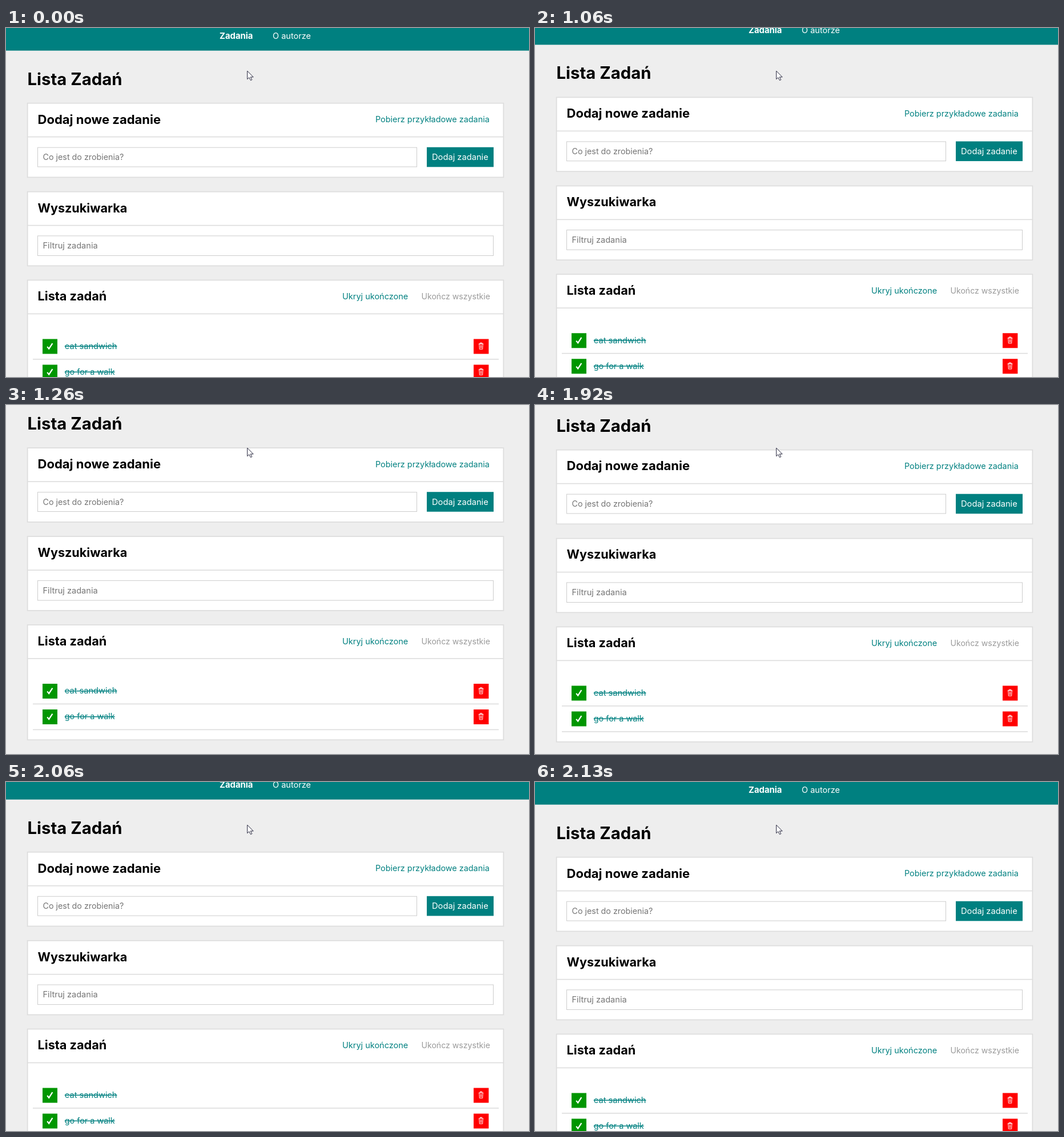
An HTML page that plays this animation: 916x611 px, repeating every 3.19 s.

```html
<!DOCTYPE html>
<html lang="pl">
<head>
<meta charset="utf-8">
<title>Lista Zadań</title>
<style>
  html, body { margin: 0; width: 100%; height: 100%; overflow: hidden; background: #eee; }
  svg { display: block; width: 916px; height: 611px; }
  text { font-family: Inter, "Open Sans", sans-serif; white-space: pre; }
  .bold { font-weight: 700; }
  .done { text-decoration: line-through; }
</style>
</head>
<body>
<svg viewBox="0 0 916 611">
  <g id="page"></g>
  <path d="M422.7 75.2V89.6L425.9 86.7L428.5 91.7L430.8 90.6L428.3 85.9H433.2Z"
        fill="#fff" stroke="#23233a" stroke-width="1" stroke-linejoin="round"/>
</svg>
<script>
const LOOP = 3190, TRAVEL = 56.5;
const TEAL = '#008080', LINE = '#ddd', HINT = '#757575';
const page = document.getElementById('page');

function add(tag, attrs, content) {
  const el = document.createElementNS('http://www.w3.org/2000/svg', tag);
  for (const key in attrs) el.setAttribute(key, attrs[key]);
  if (content) el.textContent = content;
  page.appendChild(el);
}

function rect(x, y, width, height, fill) {
  add('rect', { x, y, width, height, fill });
}

function framed(x, y, w, h, line, color) {
  rect(x, y, w, h, color);
  rect(x + line, y + line, w - 2 * line, h - 2 * line, '#fff');
}

function text(content, x, y, size, fill, style = '') {
  add('text', { x, y, fill, 'font-size': size, class: style }, content);
}

function stroke(d, width) {
  add('path', { d, fill: 'none', stroke: '#fff', 'stroke-width': width });
}

function card(title, y, h, size) {
  framed(36.8, y, 835.4, h, 1.7, LINE);
  rect(37, y + 59, 835, 1.6, LINE);
  text(title, 55.5, y + 36.7, size, '#000', 'bold');
}

function task(name, y, size) {
  rect(64, y, 26, 26, '#009600');
  stroke(`M72.2 ${y + 13.4}l3 3.8l6.2 -9.6`, 2.2);
  text(name, 102.8, y + 17.4, size, TEAL, 'done');
  rect(819, y, 26.4, 26, '#f00');
  const top = y + 8.6;
  stroke(`M827.8 ${top}h8.4M830.4 ${top - 0.6}v-1.2h3.2v1.2`, 1.1);
  stroke(`M828.7 ${top}l.6 9.2h5.4l.6 -9.2M831 ${top + 2}v5.6M833 ${top + 2}v5.6`, 0.9);
  rect(47, y + 34.6, 816, 1.6, LINE);
}

function build() {
  rect(0, -1, 916, 40.6, TEAL);
  text('Zadania', 374, 18.8, 14.9, '#fff', 'bold');
  text('O autorze', 467, 18.8, 14.5, '#fff');
  text('Lista Zadań', 37.5, 99.7, 29.3, '#000', 'bold');

  card('Dodaj nowe zadanie', 130.8, 131.4, 22);
  text('Pobierz przykładowe zadania', 647, 165.2, 14.4, TEAL);
  framed(55, 208.7, 665, 34.8, 1, '#ccc');
  text('Co jest do zrobienia?', 64.5, 231, 14.3, HINT);
  rect(737, 208.7, 117, 34.6, TEAL);
  text('Dodaj zadanie', 746, 231, 14.7, '#fff');

  card('Wyszukiwarka', 285.8, 131.4, 21.6);
  framed(55, 363.4, 799, 35.6, 1, '#ccc');
  text('Filtruj zadania', 64.5, 386, 14.6, HINT);

  card('Lista zadań', 440.6, 203, 21.7);
  text('Ukryj ukończone', 589, 475, 14.5, TEAL);
  text('Ukończ wszystkie', 727.5, 475, 14.1, '#9a9a9a');
  task('eat sandwich', 544.5, 14.6);
  task('go for a walk', 589.5, 14.4);
}

const ease = u => (1 - Math.cos(Math.PI * Math.min(1, u))) / 2;

// Eased progress, held between the moments at which the view refreshes.
function progress(t, moments, first) {
  const n = moments.filter(m => t >= m).length;
  if (!n) return 0;
  return n === moments.length ? 1 : ease(first + 0.29 * (n - 1));
}

function scrollAt(t) {
  const down = progress(t, [1060, 1130, 1190, 1260], 0.28);
  const up = progress(t, [1920, 1990, 2060, 2130], 0.16);
  return TRAVEL * (down - up);
}

const start = performance.now();
function tick() {
  const t = (performance.now() - start) % LOOP;
  page.setAttribute('transform', `translate(0 ${-scrollAt(t)})`);
  requestAnimationFrame(tick);
}

build();
tick();
</script>
</body>
</html>
```
